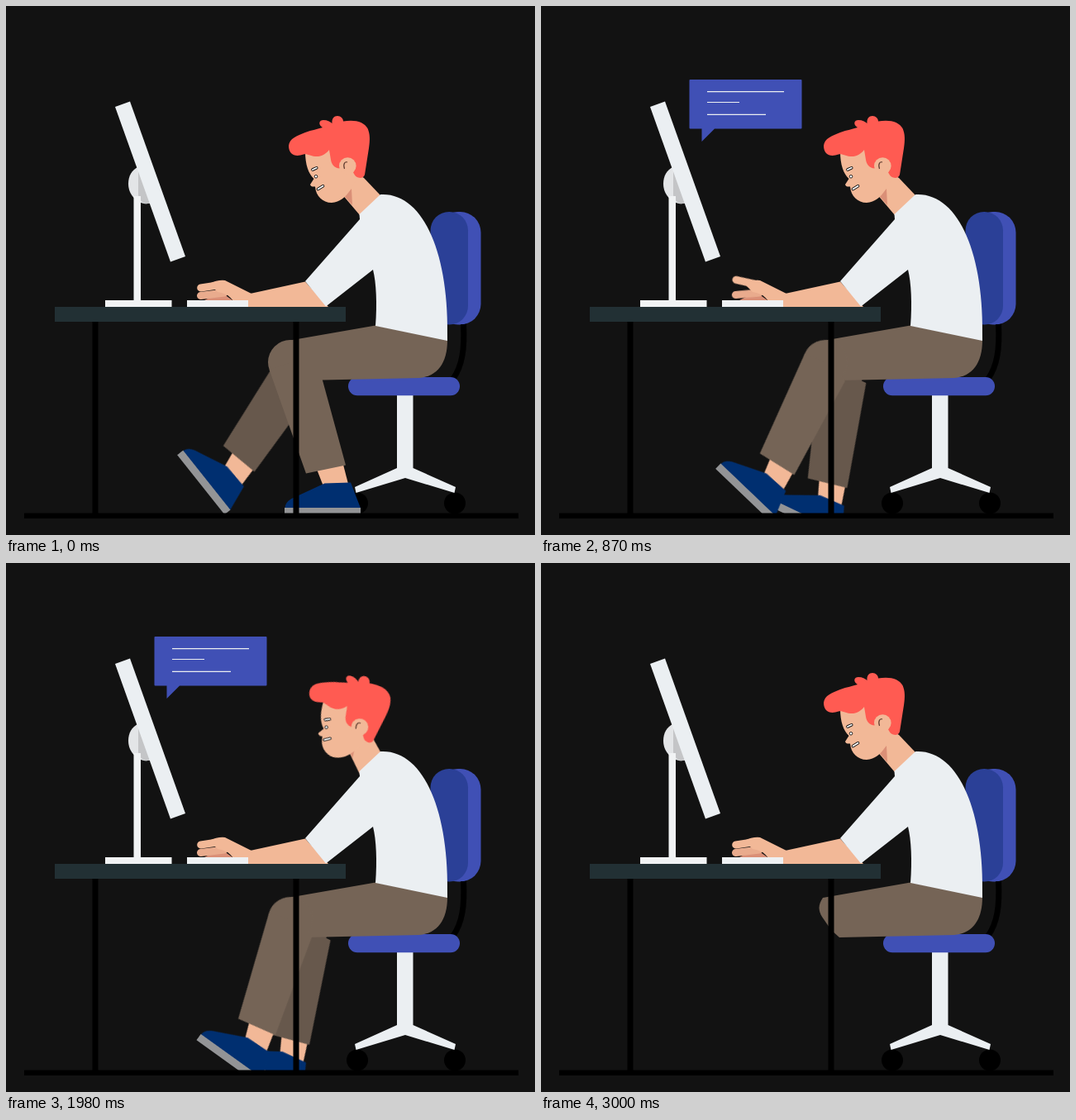
An HTML page for the animation above (3030 ms loop, 640x640 px).

```html
<!DOCTYPE html>
<html lang="en">
<head>
<meta charset="utf-8">
<title>Working at a desk</title>
<style>
  html, body { margin: 0; width: 100%; height: 100%; overflow: hidden; background: #121212; }
  svg { display: block; width: 100%; height: 100%; }

  .skin { fill: #f2b897; }
  .white { fill: #ebeff2; }
  .blue { fill: #4050b5; }
  .hair { fill: #ff5b52; }
  .pants { fill: #756456; }
  .far { --cloth: #67584c; }
  .cloth { fill: var(--cloth, #756456); }
  .shade { fill: #da8f77; }
  .finger { fill: none; stroke: #f2b897; stroke-width: 9; stroke-linecap: round; }
  .lower { stroke: #e9ab8d; }
  .mark { fill: none; stroke: #111; stroke-width: 3.6; stroke-linecap: round; }
  .mark.in { stroke: #fff; stroke-width: 1.8; }

  .move { animation: 3030ms cubic-bezier(.333, 0, .667, 1) infinite; }
  .legs { animation-name: cut; }
  .near-leg { animation-name: near; transform-origin: 344px 431px; }
  .far-leg { animation-name: far; transform-origin: 378px 422px; }
  .head { animation-name: head; transform-origin: 405px 242px; }
  .neck { animation-name: neck; transform-origin: 440px 240px; }
  .bubble { animation-name: slide; }
  .fade { animation-name: fade; animation-timing-function: linear; }
  .upper { animation-name: tap; transform-origin: 262px 337px; }
  .lower { animation-name: press; transform-origin: 264px 347px; }

  @keyframes cut {
    0%, 98.5% { visibility: visible; }
    98.51%, 100% { visibility: hidden; }
  }
  @keyframes near {
    0% { transform: rotate(0deg); }
    28.71% { transform: rotate(43.7deg); }
    54.46%, 60.4% { transform: rotate(37.4deg); }
    98.68%, 100% { transform: rotate(0deg); }
  }
  @keyframes far {
    0% { transform: rotate(26deg); }
    28.71%, 60.4% { transform: rotate(0deg); }
    98.68%, 100% { transform: rotate(26deg); }
  }
  @keyframes head {
    0%, 44.55% { transform: rotate(0deg); }
    70.3%, 75.74% { transform: rotate(20deg); }
    98.68%, 100% { transform: rotate(0deg); }
  }
  @keyframes neck {
    0%, 44.55% { transform: rotate(0deg); }
    70.3%, 75.74% { transform: rotate(16deg); }
    98.68%, 100% { transform: rotate(0deg); }
  }
  @keyframes slide {
    0%, 17.33% { transform: translateY(-54px); }
    27.4%, 68.81% { transform: translateY(0); }
    78.38%, 100% { transform: translateY(-54px); }
  }
  @keyframes fade {
    0%, 16.83% { opacity: 0; }
    22.77%, 70.96% { opacity: 1; }
    77.39%, 100% { opacity: 0; }
  }
  @keyframes tap {
    0%, 19.14%, 38.28%, 57.43%, 100% { transform: rotate(0deg); }
    9.57%, 28.71%, 47.85% { transform: rotate(21deg); }
  }
  @keyframes press {
    0%, 61%, 100% { transform: rotate(0deg); }
    17.82% { transform: rotate(-6deg); }
    28.71%, 55.45% { transform: rotate(2deg); }
    42% { transform: rotate(-4deg); }
  }
</style>
</head>
<body>
<svg viewBox="0 0 640 640" xmlns="http://www.w3.org/2000/svg">
  <defs>
    <clipPath id="above"><rect width="640" height="613.3"/></clipPath>
    <g id="leg">
      <path class="skin" d="M375 558 L407 551 L414.500 580 L384 581 Z"/>
      <path fill="#002f70" d="M337.500 607.500 C338 600 343 597 351 593.500 L385.500 577.500 L417 576.500 L429 607.500 Z"/>
      <path fill="#939496" d="M337 607 H429 V616 H337 Z"/>
      <circle class="cloth" cx="344" cy="431" r="27"/>
      <path class="cloth" d="M318.600 440 L363 565.500 L411 555.500 L377 431 L344 431 Z"/>
    </g>
  </defs>

  <rect width="640" height="640" fill="#121212"/>

  <!-- chair -->
  <rect class="blue" x="522" y="249" width="52.500" height="136.500" rx="25"/>
  <rect x="513.500" y="249" width="45.500" height="136.500" rx="22.500" fill="#2b4097"/>
  <path d="M553.500 385 C555 415 552 435 541 451" fill="none" stroke="#000" stroke-width="7"/>
  <circle cx="425" cy="601.500" r="13"/>
  <circle cx="543" cy="601.500" r="13"/>
  <path class="white" d="M473 470 H492.500 V559 L544 582 L542.500 589 L483 571 L423.500 589 L422 582 L473 559 Z"/>
  <rect class="blue" x="414" y="449" width="135" height="22.300" rx="11"/>

  <!-- legs -->
  <g clip-path="url(#above)">
    <g class="move legs">
      <g class="move far-leg">
        <use class="far" href="#leg" transform="translate(323 571) rotate(25.5) translate(-363 -565)"/>
      </g>
    </g>
    <path class="pants" d="M341 405 C335.500 413 335 420 340 428 L351 444 L361 453 L500 450 C522 448 534 432 534 404 L447 386.500 Z"/>
    <g class="move legs">
      <g class="move near-leg"><use href="#leg"/></g>
    </g>
  </g>

  <!-- neck and head -->
  <g class="move neck">
    <path class="skin" d="M400 220 L428 205 L433 208 L452 228 L456 244 L434 260 L428 253 Z"/>
    <path class="shade" d="M409 229.500 L418 221 L419 241 Z"/>
  </g>
  <g class="move head">
    <path class="skin" d="M362 176 C362 192 366 203 372.500 209 L368 216 Q368.500 219 374 218.500 C375 230 383 238 394 238 C404 237.500 411 231 417 222 L426 207 L412 170 Z"/>
    <path class="hair" d="M342 169 C343 160 352 157 362 153 C370 150 377 149 383 147 C377 143 379 138 384 138 C389 138 392 140 394.500 142 C394 136 397 133 401 133 C405 133 408 136 408 139.500 C422 137 433 140 437.500 148 C440.500 155 440.500 162 439 172 L434 204 C433 208 429 208.500 426 207.500 C421 206 420 200 418 197 L404 196.500 C397 196 394 192 393 186 L391 174 C387 179 382 182.500 374 182 C367 181 364 178.500 360 179.500 C350 183 342 180 342 169 Z"/>
    <circle class="skin" cx="413.300" cy="193.500" r="10.300"/>
    <path d="M409.500 197 C407.500 191 410 188 413 189" fill="none" stroke="#553329" stroke-width="1.100"/>
    <path class="mark" d="M371 198 L375.700 195.800"/>
    <path class="mark in" d="M371 198 L375.700 195.800"/>
    <circle cx="375" cy="206.300" r="1.800" fill="#fff" stroke="#111" stroke-width=".9"/>
    <path class="mark" d="M377.500 221.500 L383.500 217.800"/>
    <path class="mark in" d="M377.500 221.500 L383.500 217.800"/>
  </g>

  <!-- monitor -->
  <path fill="#e3e5e7" d="M160.500 194.500 C152 198 148 206 148 215 C148 229 159 239 170 239.300 L176 238.500 Z"/>
  <path fill="#c4c5c7" d="M160 195 L176 238.500 L169 239.300 Q162 237 160 229 Z"/>
  <rect x="154.500" y="230" width="8.500" height="127" fill="#f1f3f4"/>
  <path class="white" d="M132 122 L150 115.500 L217 303 L199 309.500 Z"/>
  <rect x="120" y="356" width="80.500" height="8" fill="#f1f3f4"/>

  <!-- torso and arm -->
  <path class="skin" d="M293 348.500 L362 333.500 L390 364 H290 Z"/>
  <path class="white" d="M362 333 L428 258 L427.500 252 L453 228 C505 225 537 300 534 405 L447 387 C449 360 448 335 444 319 L387 363.500 Z"/>

  <!-- hand -->
  <path class="shade" d="M240 356 L260 346 L274 356 Z"/>
  <path class="finger move lower" d="M235.500 350.500 L264 347"/>
  <path class="finger move upper" d="M235.700 341 L262 337"/>
  <path class="skin" d="M246 336 Q256 331 265 332 L298 348.500 L296 358 H276 Q268 347 256 346 Z"/>
  <rect x="219" y="356" width="74" height="8" fill="#eef1f3"/>

  <!-- desk and floor -->
  <rect x="59" y="364" width="352" height="18" fill="#223034"/>
  <rect x="104.500" y="382" width="7" height="232"/>
  <rect x="347.500" y="382" width="7" height="232"/>
  <rect x="22" y="613.500" width="598" height="6.500"/>

  <!-- speech bubble -->
  <g class="move fade">
    <g class="move bubble">
      <path class="blue" d="M180.500 89 H314.500 Q315.500 89 315.500 90 V147.500 Q315.500 148.500 314.500 148.500 H210 L194.500 164 V148.500 H180.500 Q179.500 148.500 179.500 147.500 V90 Q179.500 89 180.500 89 Z"/>
      <path d="M201 103.700 H294 M201 116.500 H240 M201 131.300 H272" stroke="#eceff1" stroke-width="1.200"/>
    </g>
  </g>
</svg>
</body>
</html>
```
